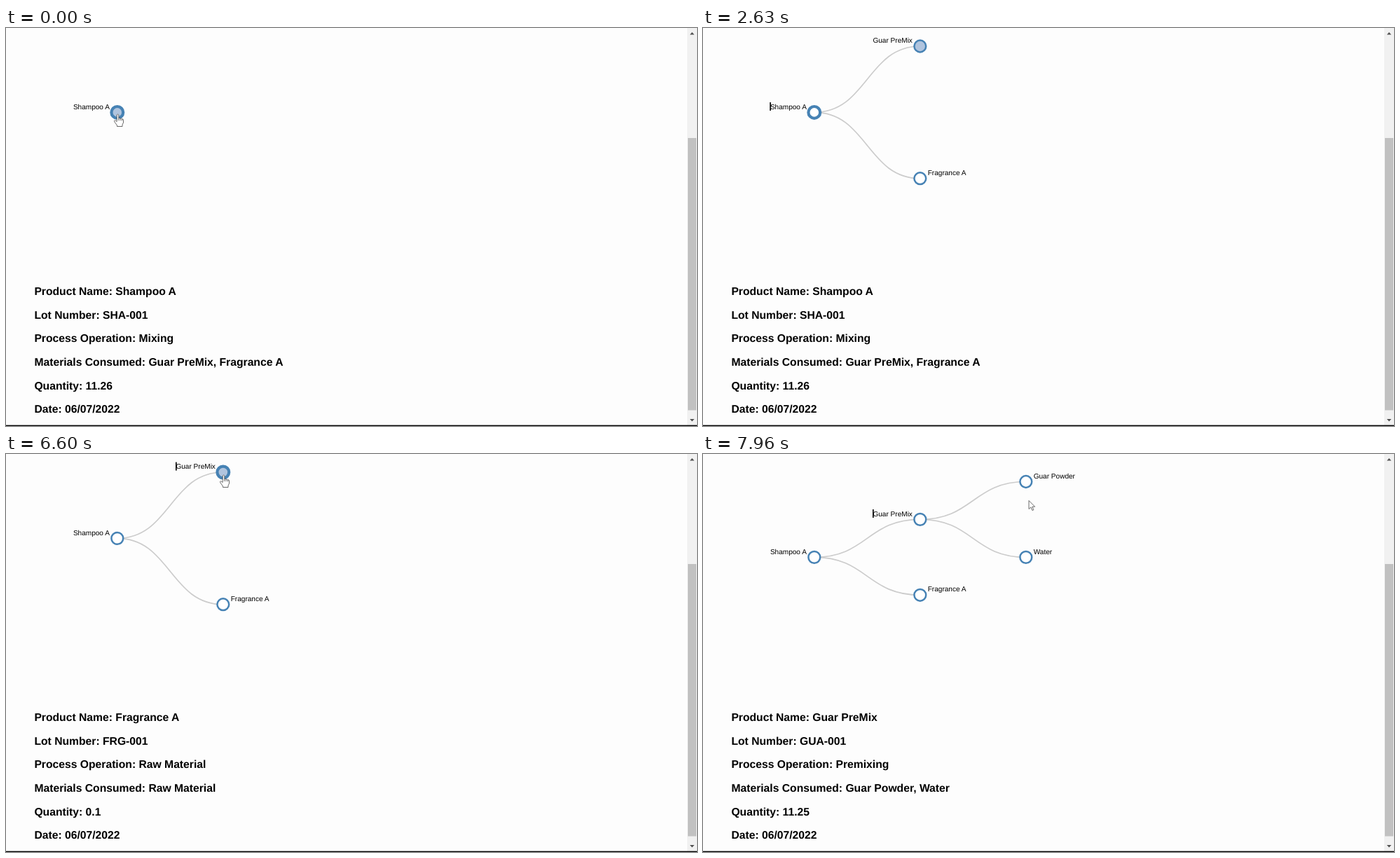
An HTML page that plays this animation: 986 by 568 pixels, repeating every 8000 ms.

```html
<!DOCTYPE html>
<html lang="en">
<head>
<meta charset="utf-8">
<title>Lot genealogy tree</title>
<style>
  html, body { margin: 0; width: 100%; height: 100%; overflow: hidden; background: #fdfdfd; }
  svg { display: block; width: 986px; height: 568px; font-family: "Liberation Sans", Arial, sans-serif; text-rendering: geometricPrecision; }
  .link { fill: none; stroke: #ccc; stroke-width: 1.7; }
  .node circle { stroke: #4682b4; }
  .node text { font-size: 10.07px; }
  .panel text { font-size: 15.7px; font-weight: bold; }
  .cursor { fill: #fff; stroke: #444; stroke-width: .8; stroke-linejoin: round; }
</style>
</head>
<body>
<svg viewBox="0 0 986 568">
  <rect width="986" height="568" fill="#fdfdfd"/>
  <g id="links"></g>
  <g id="nodes"></g>
  <rect id="caret" width="1.6" height="12"/>
  <g id="panel" class="panel"></g>
  <rect x="972" width="14" height="567" fill="#f1f1f1"/>
  <rect x="973" y="157" width="12" height="388.5" fill="#c1c1c1"/>
  <path d="M975.8 9.5h6.4l-3.2-3.6zM975.8 558h6.4l-3.2 3.6z" fill="#505050"/>
  <rect y="566.7" width="986" height="1.3"/>
  <g id="cursor" class="cursor">
    <path id="arrow" d="M0 0V12L2.9 9.4L4.9 14L6.8 13.2L4.8 8.7H8.6Z"/>
    <g id="hand">
      <path d="M-1.3 1Q0 -.8 1.3 1V5.8Q2.7 4.8 3.6 6.2Q5 5.4 6 6.9Q7.7 6.4 8 8V12L6.5 15V17.5H-1V16L-4.6 11Q-5.6 9 -4 8.6L-1.3 10.5Z"/>
      <path d="M1.3 5.8V9M3.6 6.2V9.2M6 6.9V9.4" fill="none"/>
    </g>
  </g>
</svg>
<script>
const LOOP = 8000, GROW = 750, OPEN_ROOT = 500, PICK_LEAF = 4140, OPEN_MIX = 6740;
const COL = [158.8, 309.8, 460.8], RADIUS = 8.39;

// x and y hold the place before, between and after the two expansions
const nodes = [
  { name: "Shampoo A", x: [COL[0], COL[0], COL[0]], y: [120.4, 120.4, 147.4], born: 0, opens: OPEN_ROOT },
  { name: "Guar PreMix", x: [COL[0], COL[1], COL[1]], y: [120.4, 26, 93.4], born: OPEN_ROOT, opens: OPEN_MIX, parent: 0 },
  { name: "Fragrance A", x: [COL[0], COL[1], COL[1]], y: [120.4, 214.7, 201.3], born: OPEN_ROOT, parent: 0 },
  { name: "Guar Powder", x: [COL[1], COL[1], COL[2]], y: [26, 26, 39.5], born: OPEN_MIX, parent: 1 },
  { name: "Water", x: [COL[1], COL[1], COL[2]], y: [26, 26, 147.4], born: OPEN_MIX, parent: 1 }
];

const fields = ["Product Name", "Lot Number", "Process Operation", "Materials Consumed", "Quantity", "Date"];
const details = [
  { at: 0, values: ["Shampoo A", "SHA-001", "Mixing", "Guar PreMix, Fragrance A", "11.26", "06/07/2022"] },
  { at: PICK_LEAF, values: ["Fragrance A", "FRG-001", "Raw Material", "Raw Material", "0.1", "06/07/2022"] },
  { at: OPEN_MIX, values: ["Guar PreMix", "GUA-001", "Premixing", "Guar Powder, Water", "11.25", "06/07/2022"] }
];

const carets = [
  { at: 520, node: 0, dx: -63.5 },
  { at: 4070, node: 2, dx: 11 },
  { at: 6600, node: 1, dx: -67.8 }
];
const BLINK = 527;

// time, x, y of the pointer tip
const track = [
  [0, 159.5, 123], [3530, 159.5, 123], [4060, 306.5, 208.5], [5530, 306.5, 208.5],
  [5900, 306, 93.5], [6330, 310.5, 30], [7430, 310.5, 30], [7660, 425, 52],
  [7830, 425, 52], [7960, 465, 66.5], [LOOP, 465, 66.5]
];

const $ = id => document.getElementById(id);
const mix = (a, b, p) => a + (b - a) * p;
const clamp = p => Math.max(0, Math.min(1, p));
const cubic = p => p < .5 ? 4 * p ** 3 : 1 - 4 * (1 - p) ** 3;
const smooth = p => p * p * (3 - 2 * p);
const latest = (list, t) => list.filter(e => e.at <= t).pop();
const show = (el, on) => el.setAttribute("visibility", on ? "inherit" : "hidden");
const move = (el, x, y) => el.setAttribute("transform", `translate(${x} ${y})`);

function add(parent, tag, attrs = {}) {
  const el = document.createElementNS("http://www.w3.org/2000/svg", tag);
  for (const key in attrs) el.setAttribute(key, attrs[key]);
  return parent.appendChild(el);
}

for (const n of nodes) {
  if (n.born) n.link = add($("links"), "path", { class: "link" });
  n.g = add($("nodes"), "g", { class: "node" });
  n.circle = add(n.g, "circle", { r: RADIUS });
  add(n.g, "text", { x: n.opens ? -10.9 : 10.9, y: -4.9, "text-anchor": n.opens ? "end" : "start" })
    .textContent = n.name;
}
const lines = fields.map((_, i) => add($("panel"), "text", { x: 40.4, y: 381 + 33.66 * i }));

function pointer(t) {
  const i = Math.max(1, track.findIndex(k => k[0] > t));
  const [t0, x0, y0] = track[i - 1], [t1, x1, y1] = track[i];
  const p = smooth((t - t0) / (t1 - t0));
  return [mix(x0, x1, p), mix(y0, y1, p)];
}

function draw(t) {
  const [p, q] = [OPEN_ROOT, OPEN_MIX].map(at => cubic(clamp((t - at) / GROW)));
  const place = ([a, b, c]) => mix(mix(a, b, p), c, q);
  const [cx, cy] = pointer(t);
  let over = false;

  for (const n of nodes) {
    const alive = t >= n.born;
    const x = n.px = place(n.x), y = n.py = place(n.y);
    const hover = alive && Math.hypot(cx - x, cy - y) < 10;
    over = over || hover;
    show(n.g, alive);
    move(n.g, x, y);
    n.circle.setAttribute("fill", t < n.opens ? "#b0c4de" : "#fff");
    n.circle.setAttribute("stroke-width", hover ? 4.2 : 2.5);
    if (n.link) {
      const { px, py } = nodes[n.parent], mid = (px + x) / 2;
      show(n.link, alive);
      n.link.setAttribute("d", `M${x} ${y}C${mid} ${y} ${mid} ${py} ${px} ${py}`);
    }
  }

  const c = latest(carets, t);
  show($("caret"), c && Math.floor((t - c.at) / BLINK) % 2 === 0);
  if (c) move($("caret"), nodes[c.node].px + c.dx, nodes[c.node].py - 14.4);

  const { values } = latest(details, t);
  lines.forEach((line, i) => {
    const text = `${fields[i]}: ${values[i]}`;
    if (line.textContent !== text) line.textContent = text;
  });

  show($("cursor"), t < 2500 || t >= 3530);
  move($("cursor"), cx, cy);
  show($("hand"), over);
  show($("arrow"), !over);
}

const start = performance.now();
function tick() {
  draw((performance.now() - start) % LOOP);
  requestAnimationFrame(tick);
}
tick();
</script>
</body>
</html>
```
